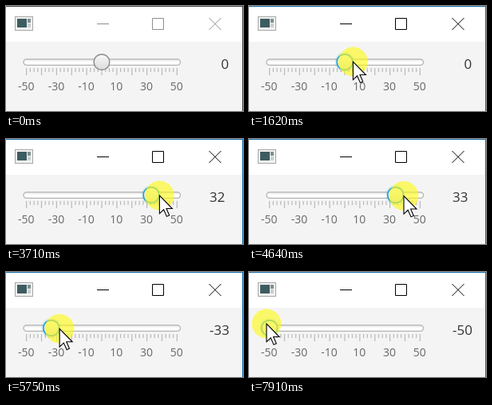
Write an HTML page that moves like this. It is 297 px wide and 132 px high and loops after 8 s.

```html
<!DOCTYPE html>
<html lang="en">
<head>
<meta charset="utf-8">
<title>Slider</title>
<style>
  html, body { margin: 0; width: 100%; height: 100%; overflow: hidden; background: #f4f4f4; }
  svg { display: block; width: 297px; height: 132px; font-family: "Open Sans", "Noto Sans", sans-serif; }
  .edge { fill: #4a4a4a; }
  .buttons { fill: none; stroke: #8f8f8f; }
  .active .edge { fill: #1c71ae; }
  .active .buttons { stroke: #000; }
  .ring { fill: #8e8e8e; }
  .active .ring { fill: #1a9fd0; }
  .glow { fill: none; }
  .active .glow { fill: #039ed3; opacity: .16; }
  .labels { font-size: 14px; fill: #686868; text-anchor: middle; }
  #value { font-size: 17px; fill: #333; }
</style>
</head>
<body>
<svg id="stage" viewBox="0 0 297 132">
  <defs>
    <linearGradient id="track" x2="0" y2="1">
      <stop offset="0" stop-color="#e4e4e4"/>
      <stop offset=".5" stop-color="#fff"/>
    </linearGradient>
    <linearGradient id="knob" x2="0" y2="1">
      <stop offset="0" stop-color="#f8f8f8"/>
      <stop offset="1" stop-color="#dcdcdc"/>
    </linearGradient>
  </defs>

  <rect width="297" height="132" fill="#f4f4f4"/>
  <rect width="297" height="45" fill="#fff"/>
  <path class="edge" d="M0 0H297V132H296V1H0Z"/>

  <g>
    <rect x="11.5" y="13.5" width="22" height="17" fill="#f3f3f3" stroke="#a5a5a5"/>
    <rect x="14" y="16" width="12" height="11" fill="#3d5c60"/>
    <rect x="27" y="16" width="4" height="5" fill="#7f8f91"/>
    <rect x="27" y="22" width="4" height="5" fill="#c9cfd0"/>
  </g>
  <g class="buttons">
    <path d="M114 22.5H129M183.5 15.5H197.5V29.5H183.5Z"/>
    <path d="M254.5 15L269.5 30M269.5 15L254.5 30"/>
  </g>

  <rect x="22" y="66.8" width="196.5" height="7.6" rx="3.8" fill="url(#track)" stroke="#b3b3b3" stroke-width="1.3"/>
  <path id="ticks" stroke="#b9b9b9" stroke-width="1.2"/>
  <g id="labels" class="labels"></g>
  <text id="value" y="79"></text>

  <g id="thumb">
    <circle class="glow" r="12.2"/>
    <circle class="ring" r="10.6"/>
    <circle r="9.1" fill="url(#knob)"/>
  </g>
  <g id="pointer">
    <circle id="halo" r="18.4" fill="#fffb14" fill-opacity=".62"/>
    <path d="M0 0V22.8L5.2 17.8L9 26.4L12.3 25L8.6 16.5H16Z" fill="#fff" stroke="#000" stroke-width="1.1"/>
  </g>
</svg>
<script>
  const LOOP = 8000, ZERO = 120, UNIT = 1.887, GRAB = 10.4;
  const START = [188, 140];
  const PRESS = 1380, DRAG = 2240;
  const held = [[PRESS, 4100], [4640, 6820], [7380, LOOP]];

  // first step, last step, number of steps, pointer x, pointer y
  const moves = [
    [540, 920, 6, 124, 65],
    [1000, 1150, 3, 130.4, 70],
    [2240, 2470, 4, 138.5, 70],
    [2780, 3560, 11, 188, 71],
    [3650, 3710, 2, 192.4, 71],
    [3870, 3930, 2, 194, 71.5],
    [4890, 5510, 9, 68, 73],
    [5660, 6130, 7, 65, 67],
    [6280, 6280, 1, 65, 66],
    [7610, 7910, 5, 22, 65]
  ];

  const $ = id => document.getElementById(id);
  const place = (el, x, y) => el.setAttribute("transform", `translate(${x} ${y})`);

  function buildScale() {
    let ticks = "", labels = "";
    for (let i = 0; i <= 40; i++) {
      const v = i * 2.5 - 50, x = ZERO + v * UNIT;
      ticks += `M${x} 78V${i % 4 ? 83 : 87}`;
      if (i % 8 === 0) labels += `<text x="${x - .5}" y="106">${v}</text>`;
    }
    // the far end carries its label too
    if (!labels.includes(">50<")) labels += `<text x="${ZERO + 50 * UNIT - .5}" y="106">50</text>`;
    $("ticks").setAttribute("d", ticks);
    $("labels").innerHTML = labels;
  }

  function pointerAt(t) {
    let [x, y] = START;
    for (const [from, to, steps, nx, ny] of moves) {
      if (t < from) break;
      const gap = (to - from) / (steps - 1) || 1;
      const p = Math.min(steps, Math.floor((t - from) / gap + 1e-6) + 1) / steps;
      x += (nx - x) * p;
      y += (ny - y) * p;
    }
    return [x, y];
  }

  function render(t) {
    const [x, y] = pointerAt(t);
    const dragged = t >= DRAG;
    const v = dragged ? Math.max(-50, Math.min(50, (x - GRAB - ZERO) / UNIT)) : 0;
    $("stage").classList.toggle("active", t >= PRESS);
    place($("pointer"), x, y);
    place($("thumb"), ZERO + v * UNIT, 70.5);
    $("halo").style.display = held.some(([a, b]) => t >= a && t < b) ? "" : "none";
    $("value").textContent = String(Math.trunc(v) || 0);
    $("value").setAttribute("x", dragged ? 255 : 269.5);
  }

  function tick() {
    render(performance.now() % LOOP);
    requestAnimationFrame(tick);
  }

  buildScale();
  tick();
</script>
</body>
</html>
```
